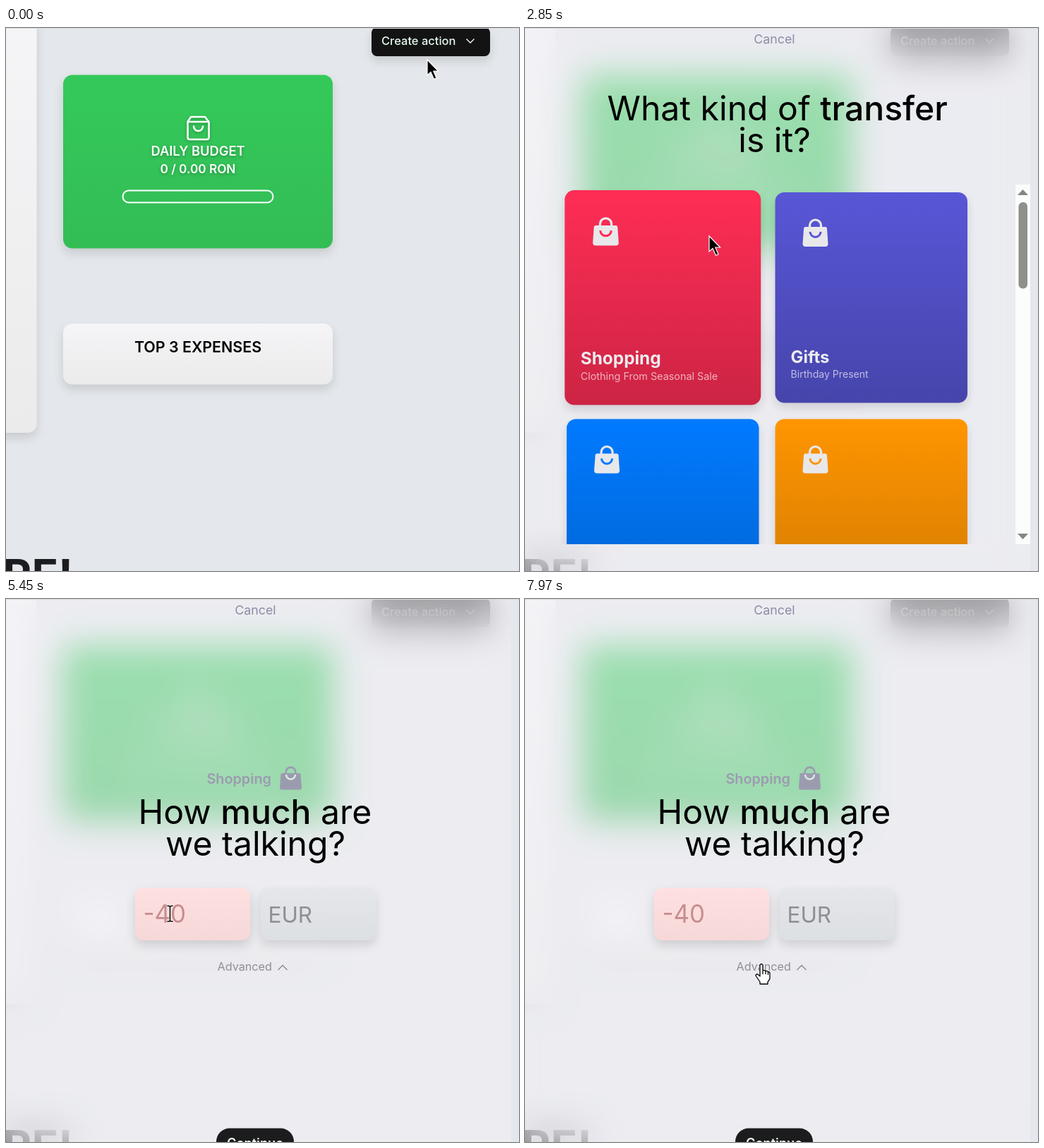
An HTML page that plays this animation: 727x770 px, repeating every 8 s.

```html
<!DOCTYPE html>
<html lang="en">
<head>
<meta charset="utf-8">
<title>Budget transfer</title>
<style>
  html, body { margin: 0; width: 100%; height: 100%; overflow: hidden; background: #e4e7eb; }
  #stage { position: relative; width: 727px; height: 770px; overflow: hidden; }
  #stage > svg { position: absolute; left: 0; top: 0; }
  #glass {
    position: absolute; top: 0; height: 770px;
    background: rgba(242, 241, 245, .54);
    backdrop-filter: blur(24px);
  }
  text { font-family: Inter, "Open Sans", sans-serif; white-space: pre; }
  .mid { text-anchor: middle; }
  .semi { font-weight: 600; }
  .big { font-size: 48.1px; }
  .big tspan { font-weight: 500; }
  .soft { filter: drop-shadow(0 7px 7px rgba(0, 0, 0, .12)); }
  .lit { filter: drop-shadow(0 2px 2px rgba(0, 0, 0, .25)); }
</style>
</head>
<body>
<div id="stage">
  <svg width="727" height="770">
    <defs>
      <linearGradient id="paper" x2="0" y2="1"><stop stop-color="#f5f5f7"/><stop offset="1" stop-color="#ebebec"/></linearGradient>
      <linearGradient id="green" x2="0" y2="1"><stop stop-color="#34c95a"/><stop offset="1" stop-color="#33bd55"/></linearGradient>
      <linearGradient id="pink" x2="0" y2="1"><stop stop-color="#ffe0e0"/><stop offset="1" stop-color="#f7d8d8"/></linearGradient>
      <linearGradient id="grey" x2="0" y2="1"><stop stop-color="#e5e7ea"/><stop offset="1" stop-color="#dcdfe3"/></linearGradient>
      <linearGradient id="shade" x2="0" y2="1"><stop stop-opacity="0"/><stop offset="1" stop-opacity=".2"/></linearGradient>
      <g id="bag">
        <path d="M4 12H32Q34 12 34.400 14L36 36Q36 40 32 40H4Q0 40 0 36L1.600 14Q2 12 4 12Z"/>
        <path d="M10 13V10a8 8 0 0 1 16 0V13" fill="none" stroke="currentColor" stroke-width="3.200"/>
      </g>
    </defs>
    <rect width="727" height="770" fill="#e4e7eb"/>
    <rect class="soft" x="-60" y="-14" width="103.500" height="588" rx="13" fill="url(#paper)"/>
    <rect class="soft" x="81" y="66.500" width="382" height="246" rx="13" fill="url(#green)"/>
    <g class="lit" fill="none" stroke="#fff" stroke-width="2.600" stroke-linejoin="round" stroke-linecap="round">
      <path d="M262 126H282L287.500 133V155Q287.500 158 284.500 158H260.500Q257.500 158 257.500 155V133ZM257.500 133H287.500M266 139.500a6.500 6.500 0 0 0 13 0"/>
    </g>
    <g class="lit mid semi" fill="#fff">
      <text x="272" y="181" font-size="18.300">DAILY BUDGET</text>
      <text x="272" y="206" font-size="17.200">0 / 0.00 RON</text>
    </g>
    <rect x="165.500" y="230.500" width="213" height="17" rx="8.500" fill="none" stroke="#fff" stroke-width="2"/>
    <rect class="soft" x="81" y="419" width="382" height="86.500" rx="13" fill="url(#paper)"/>
    <text class="mid semi" x="272" y="460" font-size="21.400">TOP 3 EXPENSES</text>
    <text x="95" y="798" font-size="62" font-weight="700" text-anchor="end" fill="#1c1c1e">RE!</text>
    <g id="button">
      <rect class="soft" x="518" y="-1" width="168" height="41" rx="8" fill="#131314"/>
      <text x="532" y="24" font-size="16.500" font-weight="500" fill="#e4f8ea">Create action</text>
      <path d="M652.500 15.500L658 21L663.500 15.500" fill="none" stroke="#fff" stroke-width="1.300"/>
    </g>
    <g id="menu">
      <rect class="soft" x="504" y="48.500" width="196" height="121" rx="8" fill="#f8f9fb"/>
      <rect id="hover" x="511" width="182" height="30" rx="5" fill="#c3efcc"/>
      <g font-size="12.200" font-weight="500" fill="#3a3a3c">
        <text x="541" y="75">Commit</text><text x="541" y="113">Transfer</text><text x="541" y="151">Goal</text>
      </g>
    </g>
  </svg>
  <div id="glass"></div>
  <svg width="727" height="770">
    <clipPath id="edge"><rect id="edgeBox" y="0" height="770"/></clipPath>
    <clipPath id="view"><rect y="222" width="695" height="510"/></clipPath>
    <g id="modal" clip-path="url(#edge)">
      <text id="cancel" class="mid" y="22" font-size="17.800" fill="#8b8ba5">Cancel</text>
      <g id="pick">
        <text id="ask" class="big" y="131">What kind of <tspan>transfer</tspan></text>
        <text id="ask2" class="big mid" y="176">is it?</text>
        <g id="cards" clip-path="url(#view)"></g>
        <rect x="695" y="222" width="21" height="510" fill="#fbfcfc"/>
        <rect id="thumb" x="699.500" y="247" width="12.500" rx="6" fill="#8f8f8c"/>
        <path d="M698 237L705.500 229L713 237ZM698 717L705.500 725L713 717Z" fill="#858583"/>
        <g id="wideBar" fill="#8f8f8c">
          <rect x="504" y="710" width="212" height="22" fill="#fbfcfc"/>
          <rect x="529" y="715" width="112" height="12.500" rx="6"/>
          <path d="M518 714V728L510 721ZM681 714V728L689 721Z"/>
        </g>
      </g>
      <g id="form">
        <g id="upper">
          <g fill="#9b9bb0" color="#9b9bb0">
            <text class="semi" x="284.500" y="262" font-size="19.800">Shopping</text>
            <use href="#bag" transform="translate(388 237) scale(.86 .84)"/>
          </g>
          <path d="M397 249a6.500 6.500 0 0 0 13 0" fill="none" stroke="#dcebe2" stroke-width="2.400"/>
          <text class="big mid" x="353" y="319">How <tspan>much</tspan> are</text>
          <text class="big mid" x="353.500" y="364">we talking?</text>
          <rect class="soft" x="183" y="409.500" width="163" height="74.500" rx="12" fill="url(#pink)"/>
          <rect class="soft" x="361" y="409.500" width="163" height="74.500" rx="12" fill="url(#grey)"/>
          <rect id="mark" y="425" height="43" fill="#3390ff" opacity=".55"/>
          <text id="sum" x="194.500" y="459" font-size="34.800" fill="#c78d8f"></text>
          <text id="unit" x="371.500" y="459" font-size="31.500" fill="#8e8f94"></text>
        </g>
        <text id="error" class="mid" x="353" y="505" font-size="17.600" font-weight="300" fill="#f2a39f">Currency must have 3 letters</text>
        <g id="more">
          <text x="299.500" y="526.500" font-size="16.200" fill="#8e8e93">Advanced</text>
          <path d="M385.500 526L392 519.500L398.500 526" fill="none" stroke="#8e8e93" stroke-width="1.500"/>
        </g>
        <rect x="298" y="750.500" width="110" height="40" rx="19" fill="#1c1c1e"/>
        <text class="mid semi" x="353" y="777.500" font-size="18.200" fill="#eefaf2">Continue</text>
        <g id="hint" class="lit">
          <path d="M429 497L441 485.500L453 497Z" fill="#1f1f1f"/>
          <rect x="412" y="495.500" width="221" height="64" rx="9" fill="#1f1f1f"/>
          <text x="429" y="534" font-size="17.600" font-weight="600" fill="#f0f0f0" style="font-family:'Open Sans',sans-serif">EUR</text>
        </g>
      </g>
    </g>
    <g id="cursor">
      <path id="arrow" d="M0 0V22L5 17.500L9.500 27.500L13 26L8.800 16H15.500Z" stroke="#fff" stroke-width="1.200"/>
      <g id="beam" fill="none">
        <path d="M-4 -11H-1.500L0 -10L1.500 -11H4M0 -10V10M-4 11H-1.500L0 10L1.500 11H4" stroke="#fff" stroke-width="3" opacity=".6"/>
        <path d="M-4 -11H-1.500L0 -10L1.500 -11H4M0 -10V10M-4 11H-1.500L0 10L1.500 11H4" stroke="#000" stroke-width="1.500"/>
      </g>
      <path id="hand" d="M-2 1Q0 -2 2 1V9Q4 7.500 6 10Q8 8.500 9.500 11Q12 10 12 13V20Q11 23 9 25V28H-2V25L-8 16Q-7 12.500 -4 15L-2 17ZM2 9V14M6 10V14M9.500 11V15" fill="#fff" stroke="#000" stroke-width="1.300" stroke-linejoin="round"/>
    </g>
    <rect width="727" height="1" fill="#d8dbdf"/>
  </svg>
</div>
<script>
const LOOP = 8000, STEP = 68.6, OPEN = 1726, RIGHT = 716;
const $ = id => document.getElementById(id);
const set = (el, attrs) => { for (const k in attrs) el.setAttribute(k, attrs[k]); };
const show = (el, on) => set(el, { opacity: +on, visibility: on > 0 ? "visible" : "hidden" });
const ramp = (t, a, b) => {
  const p = Math.min(1, Math.max(0, (t - a) / (b - a)));
  return p * p * (3 - 2 * p);
};

// Cursor stops: time, x, y
const PATH = [
  [80, 597, 45], [360, 590, 22], [900, 590, 22], [1030, 606, 24], [1500, 572, 100],
  [2550, 572, 100], [2820, 261, 295], [3400, 261, 295], [3950, 269, 443], [4290, 269, 443],
  [4430, 284, 446], [4520, 284, 446], [4850, 208, 446], [5340, 208, 446], [5730, 386, 448],
  [5870, 386, 448], [6070, 425, 450], [6450, 414, 455], [6690, 414, 455], [7150, 430, 450],
  [7560, 430, 450], [7969, 335, 518]
];
function pointer(t) {
  const i = PATH.findIndex(p => p[0] > t);
  if (i === 0) return PATH[0].slice(1);
  if (i < 0) return PATH.at(-1).slice(1);
  const [a, x, y] = PATH[i - 1], [b, u, v] = PATH[i], p = ramp(t, a, b);
  return [x + (u - x) * p, y + (v - y) * p];
}

const CARDS = [
  ["#ff2d55", "Shopping", "Clothing From Seasonal Sale"], ["#5856d6", "Gifts", "Birthday Present"],
  ["#007aff", "Coffee", "New House"], ["#ff9500", "Food", "Evening Feast"],
  ["#5ac8fa", "Travel", "Autumn Flight"], ["#34c759", "Salary", "Total Income"],
  ["#ff3b30", "Phone", "Electronics Bill"], ["#ffcc00", "Light", "Lamp Bill"],
  ["#5ac8fa", "Transport", "Public Service"], ["#34c759", "Win", "Weekly Savings"],
  ["#007aff", "Health", "Check Up"], ["#8e8e93", "Other", "Any Reason"]
].map(([color, title, note], i) => {
  const g = document.createElementNS("http://www.w3.org/2000/svg", "g");
  const words = note.split(" ").slice(-2);
  g.innerHTML = `<rect class="soft" rx="13" fill="${color}"/><rect rx="13" fill="url(#shade)"/>
    <g fill="#e8e8eb" color="#e8e8eb"><use href="#bag"/>
    <path d="M10.500 19a7.500 7.500 0 0 0 15 0" fill="none" stroke="${color}" stroke-width="3"/></g>
    <svg><text font-size="23.900" font-weight="700" x="22" fill="#ececef">${title}</text></svg>
    <svg><text font-size="14.100" x="22" fill="#fff" fill-opacity=".65">${note}</text>
    <g font-size="13" fill="#fff"><text x="22" y="26">${words[0]}</text><text x="22" y="45">${words[1] || ""}</text></g></svg>`;
  $("cards").append(g);
  const [face, shade, icon, titleBox, noteBox] = g.children;
  return { g, face, shade, icon, titleBox, noteBox, col: i % 2, row: i >> 1 };
});

function drawCards(left, k, lift) {
  const x0 = left + 68, gap = 23 - 14 * k;
  const w = (627 + 14 * k - x0 - gap) / 2, h = Math.max(72, w + 26);
  const narrow = w < 100;
  for (const c of CARDS) {
    const x = x0 + c.col * (w + gap), y = 233 + c.row * (h + 23);
    const s = c.row + c.col ? 1 : 1 + .02 * lift;
    set(c.g, { transform: `translate(${x + w / 2 * (1 - s)} ${y + h / 2 * (1 - s)}) scale(${s})` });
    for (const box of [c.face, c.shade, c.titleBox, c.noteBox]) set(box, { width: w, height: h });
    set(c.icon, { transform: "translate(39 37)" });
    show(c.icon, !narrow);
    const spill = narrow && !c.col && [1, 3, 4].includes(c.row);
    if (spill) set(c.titleBox, { width: 69 });
    show(c.titleBox, !narrow || spill);
    set(c.titleBox.firstChild, { y: narrow ? 60 : h - 56.5 });
    set(c.noteBox.firstChild, { y: h - 35 });
    show(c.noteBox.firstChild, !narrow);
    show(c.noteBox.lastChild, narrow);
  }
  set($("thumb"), { height: 16 + 34218 / (h + 23) });
  show($("wideBar"), narrow);
}

function drawPage(t, y) {
  show($("button"), 1 - .22 * ramp(t, 1600, 1726));
  show($("menu"), ramp(t, 420, 600) * (1 - ramp(t, 1600, 1860)));
  const item = t < OPEN + 300 ? Math.floor((y - 56) / 38) : -1;
  show($("hover"), item >= 0 && item < 3 && t > 420 && t < 1860);
  set($("hover"), { y: 56 + 38 * item });
}

function drawModal(t) {
  const on = t >= OPEN, k = on ? Math.exp((OPEN - t) / 116) : 1;
  const left = -9 + 513 * k, mid = (left + RIGHT) / 2, fade = on ? 1 - .8 * k : 0;
  Object.assign($("glass").style, {
    left: left + "px", width: RIGHT - left + "px", opacity: fade, display: on ? "block" : "none"
  });
  show($("modal"), fade);
  if (!on) return;
  set($("edgeBox"), { x: left, width: RIGHT + 1 - left });
  set($("cancel"), { x: mid });
  set($("ask"), { x: Math.max(mid - 237, left + 37) });
  set($("ask2"), { x: mid });
  const leave = 1 - ramp(t, 3040, 3180);
  show($("pick"), leave);
  if (leave) drawCards(left, k, ramp(t, 2700, 2820));
}

function drawForm(t, x) {
  show($("form"), ramp(t, 3140, 3440));
  const wrong = t >= 6130 && t < 6830;
  const shift = 5 * (ramp(t, 6130, 6270) - ramp(t, 6830, 6970));
  set($("upper"), { transform: `translate(0 ${-shift})` });
  set($("more"), { transform: `translate(0 ${shift})` });
  show($("error"), wrong);
  show($("hint"), wrong);
  $("sum").textContent = t < 5130 ? "-80" : t < 5300 ? "-4" : "-40";
  $("unit").textContent = wrong ? "EU" : "EUR";
  const from = Math.max(213, Math.min(256, x));
  show($("mark"), t > 4520 && t < 5130);
  set($("mark"), { x: from, width: 256 - from });
}

function drawCursor(t, x, y) {
  const inForm = t > 3200;
  const beam = inForm && y > 409 && y < 484 && (x > 183 && x < 346 || x > 361 && x < 524);
  const hand = inForm && y > 508 && x > 298 && x < 400;
  set($("cursor"), { transform: `translate(${x} ${y})` });
  show($("beam"), beam);
  show($("hand"), hand);
  show($("arrow"), !beam && !hand);
}

function draw(now) {
  const raw = now % LOOP;
  const t = raw < 80 ? 0 : 80 + Math.floor((raw - 80) / STEP) * STEP;
  const [x, y] = pointer(t);
  drawPage(t, y);
  drawModal(t);
  drawForm(t, x);
  drawCursor(t, x, y);
}

let start;
function tick(now) {
  start ??= now;
  draw(now - start);
  requestAnimationFrame(tick);
}
draw(0);
requestAnimationFrame(tick);
</script>
</body>
</html>
```
